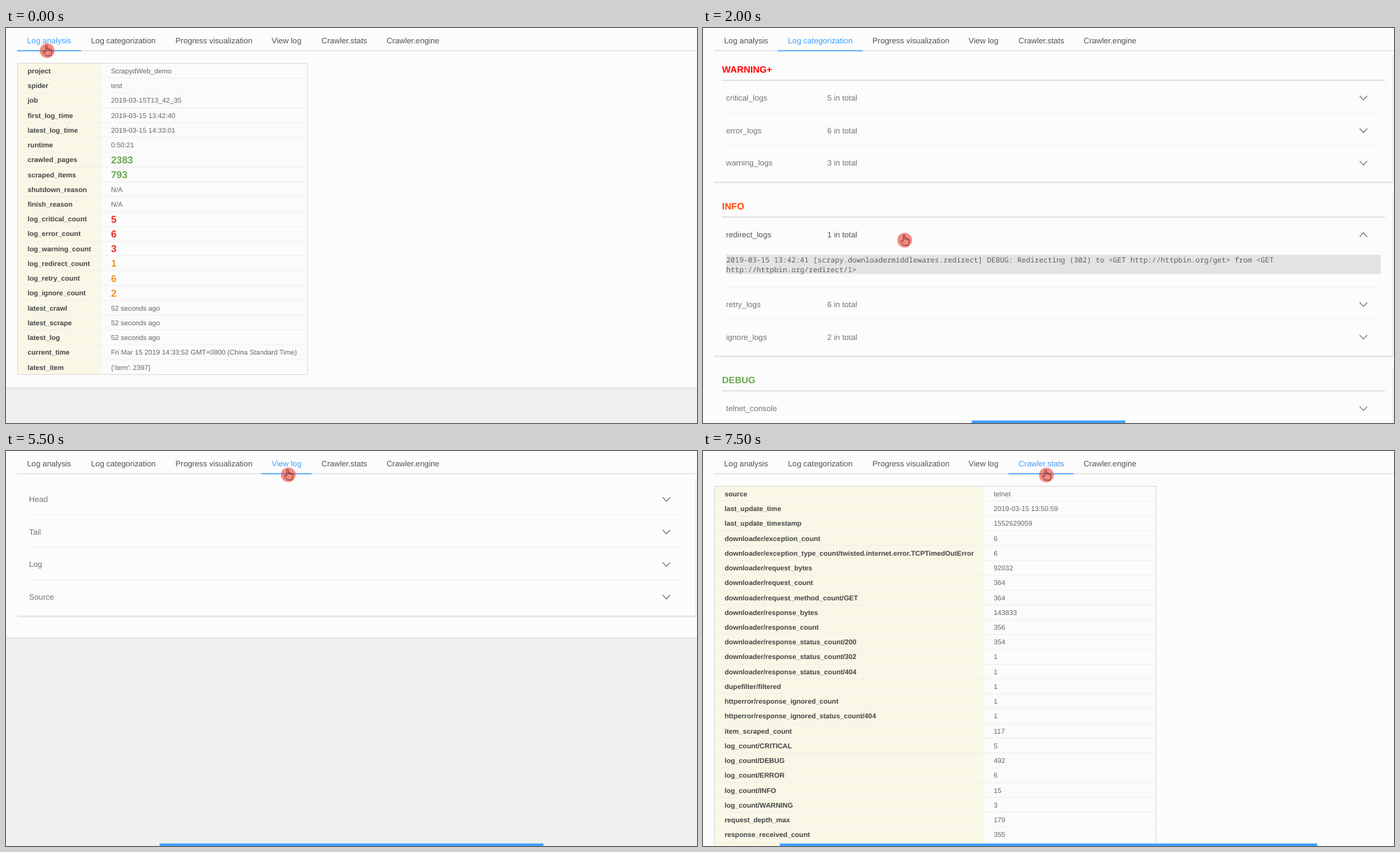
An HTML page for the animation above (8 s loop, 990x566 px).

```html
<!DOCTYPE html>
<html lang="en">
<head>
<meta charset="utf-8">
<title>Crawl log dashboard</title>
<style>
html, body { margin: 0; width: 100%; height: 100%; overflow: hidden; background: #fcfcfc; }
svg { display: block; width: 990px; height: 566px; font-family: "Liberation Sans", Arial, sans-serif; text-rendering: geometricPrecision; }
.scene { visibility: hidden; animation: 8s step-end infinite; }
.mono { font-family: "Noto Sans Mono", monospace; }
.chart { font-family: "Noto Sans", sans-serif; }
</style>
</head>
<body>
<svg id="stage" viewBox="0 0 990 566"></svg>
<script>
const LOOP = 8000, BLUE = '#409eff', GREEN = '#6aa84f', RED = '#f02a1d', ORANGE = '#ee922c';
const stage = document.getElementById('stage');
const css = document.createElement('style');
document.head.append(css);

const esc = s => String(s).replace(/&/g, '&amp;').replace(/</g, '&lt;');
const rect = (x, y, w, h, fill) => `<rect x="${x}" y="${y}" width="${w}" height="${h}" fill="${fill}"/>`;
const path = (d, stroke, width = 1, fill = 'none') =>
  `<path d="${d}" fill="${fill}" stroke="${stroke}" stroke-width="${width}"/>`;
const text = (x, y, str, size, fill, extra = '') =>
  `<text x="${x}" y="${y}" font-size="${size}" fill="${fill}" ${extra}>${esc(str)}</text>`;
const BOLD = 'font-weight="700"';

// Page furniture
const TABS = [
  ['Log analysis', 16, 107.5], ['Log categorization', 107.5, 228.5],
  ['Progress visualization', 228.5, 366.3], ['View log', 366.3, 437.7],
  ['Crawler.stats', 437.7, 531], ['Crawler.engine', 531, 635]
];
function tabs(active) {
  const [, left, right] = TABS[active];
  return rect(16, 31.8, 974, 1.4, '#dcdde0') + rect(left, 31.8, right - left, 1.5, BLUE) +
    TABS.map(([name, x], i) => text(x + 14.3, 22, name, 11.33, i === active ? BLUE : '#505255')).join('');
}
const bar = step => rect(495 - 55 * step, 562.4, 110 * step, 3.6, BLUE);
const hand = (x, y) => `<g transform="translate(${x} ${y})"><circle r="10.6" fill="#ee3f30" fill-opacity=".6"/>` +
  path('M-2.2 1.5V-6.2a1.2 1.2 0 0 1 2.4 0V-1M.2-2.2a1.1 1.1 0 0 1 2.2.3V-.4M2.4-1.7a1.1 1.1 0 0 1 2.1.4V.2' +
    'M4.5-.9a1 1 0 0 1 1.9.5V3L5 7.3H-1.6L-5.6 2.3c-.7-1.3.8-2.2 1.8-1.3L-2.2 2.4', '#6b2723', 0.9) + '</g>';
const footer = y => rect(0, y, 990, 566 - y, '#f0f0f0') + rect(0, y - 1, 990, 1.6, '#d9e2ec');

// Two-column table
function table(rows, split, right) {
  const top = 50.5, pitch = 21.24, bottom = top + rows.length * pitch;
  let out = rect(16.5, top, right - 16.5, bottom - top, '#fbfbfb') + rect(17, top, split - 17, bottom - top, '#f9f8e7');
  rows.forEach(([key, value, color], i) => {
    const mid = top + (i + 0.5) * pitch;
    if (i) out += rect(17, mid - pitch / 2 - 0.35, right - 17, 0.7, '#ebebea');
    out += text(31, mid + 3.7, key, 9.91, '#444', BOLD) +
      (color ? text(split + 14.3, mid + 5.2, value, 14.16, color, BOLD)
             : text(split + 14.3, mid + 3.7, value, 9.91, '#666'));
  });
  return out + path(`M16.5 ${top}H${right}V${bottom}H16.5Z`, '#d9d9d9', 0.9);
}

// Collapsible cards
const chevron = (y, open) => {
  const d = open ? -3 : 3;
  return path(`M940.8 ${y + 0.3 - d}L946.2 ${y + 0.3 + d - (open ? 0 : 0.2)}L951.6 ${y + 0.3 - d}`, '#76787b', 1.25);
};
const item = (y, name, total = '', open = false) =>
  text(33, y + 4, name, 11.33, open ? '#555' : '#747679') +
  text(178, y + 4, total, 11.33, open ? '#555' : '#747679') + chevron(y, open);
const rule = y => rect(32.5, y - 0.35, 938.5, 0.8, '#ebeef2');
const card = (top, bottom) => rect(988, top, 1.2, bottom - top, '#e6e8ec') +
  rect(16, bottom - 0.8, 973, 1.7, '#d9e0ea') + rect(16, bottom + 0.9, 973, 1, '#f0f3f6');
const heading = (y, name, color) => text(27.3, y + 4.6, name, 13.25, color, BOLD) + rect(27, y + 15.2, 950, 1.4, '#dadada');
const mono = (y, line) => text(33.3, y + 3.5, line, 10.38, '#606060', 'class="mono"');

function categories(open) {
  const shift = open ? 53.3 : 0, row = 46.65;
  let out = heading(59, 'WARNING+', '#f00');
  ['critical_logs,5', 'error_logs,6', 'warning_logs,3'].forEach((s, i) => {
    const [name, n] = s.split(',');
    out += item(100 + i * row, name, n + ' in total') + (i < 2 ? rule(122 + i * row) : '');
  });
  out += card(40, 221) + heading(255, 'INFO', '#ff4500') + item(296, 'redirect_logs', '1 in total', open);
  if (open) {
    out += rect(33, 325, 938, 27.5, '#e3e3e3') +
      mono(332.5, '2019-03-15 13:42:41 [scrapy.downloadermiddlewares.redirect] DEBUG: Redirecting (302) to <GET http://httpbin.org/get> from <GET') +
      mono(346, 'http://httpbin.org/redirect/1>');
  }
  out += rule(317.9 + shift) + item(342.7 + shift, 'retry_logs', '6 in total') +
    rule(364.4 + shift) + item(389.3 + shift, 'ignore_logs', '2 in total') + card(237, 417 + shift) +
    heading(450.7 + shift, 'DEBUG', GREEN) + item(491.8 + shift, 'telnet_console') + rect(988, 433 + shift, 1.2, 140, '#e6e8ec');
  if (!open) out += rule(513.7) + item(538.4, 'latest_crawl');
  return out;
}

// Charts
const PAGES = [0, 0, 43, 49, 52, 50, 42, 50, 50, 50, 50, 48, 49, 49, 51, 52, 48, 49, 36, 45, 48, 48, 49, 48, 49, 49,
  51, 49, 49, 50, 39, 50, 50, 49, 50, 49, 51, 50, 48, 50, 50, 52, 42, 49, 52, 49, 51, 49, 47, 49, 50];
const ITEMS = [0, 0, 15, 16, 17, 17, 14, 17, 16, 17, 17, 16, 16, 16, 17, 18, 16, 16, 12, 15, 16, 16, 16, 16, 16, 16,
  17, 17, 16, 17, 13, 17, 16, 17, 16, 17, 16, 17, 16, 17, 17, 17, 14, 16, 18, 16, 17, 16, 16, 16, 17];
const LEFT = 113.5, BAND = 15.245, RIGHT = LEFT + 51 * BAND;
const sums = list => { let n = 0; return list.map(v => n += v); };

function series(list, base, unit, color) {
  const pts = list.map((v, i) => [(LEFT + (i + 0.5) * BAND).toFixed(2), (base - v * unit).toFixed(2)]);
  return path('M' + pts.join('L'), color, 1.4) +
    pts.map(([x, y]) => `<circle cx="${x}" cy="${y}" r="1.5" fill="#fff" stroke="${color}" stroke-width=".8"/>`).join('');
}
function axis(base, gap, step, count) {
  let out = '';
  for (let i = 0; i <= count; i++) {
    const y = base - i * gap;
    if (i) out += rect(LEFT, y - 0.4, RIGHT - LEFT, 0.9, '#d4d4d4');
    out += path(`M${LEFT - 3.6} ${y}H${LEFT}`, '#444', 0.9) +
      text(107.8, y + 2.6, (i * step).toLocaleString('en-US'), 8.75, '#444', 'text-anchor="end"');
  }
  return out + path(`M${LEFT} ${base - gap * count}V${base}H${RIGHT}`, '#444', 1);
}
const tools = y => `<g transform="translate(0 ${y})">` +
  path('M487.7-.6a5.2 5.2 0 0 1 9.6-2.2M498.2.6a5.2 5.2 0 0 1-9.6 2.2M497.8-5.3v2.8h-2.8M488.2 5.3v-2.8h2.8' +
    'M507.2 1.5v3.7h9.6V1.5M512-5.3v7.8M509.2-.2l2.8 2.8l2.8-2.8', '#777', 0.9) + '</g>';
const handle = x => rect(x - 2.2, 312.3, 4.4, 11, '#a7b7cc') + path(`M${x} 308V328M${x - 0.7} 315v5.5M${x + 0.7} 315v5.5`, '#8fa2ba', 0.6);

function progress() {
  let out = '<g class="chart">' + text(20, 63.5, 'count / total', 12.8, '#333', BOLD) + tools(61) +
    text(20, 358, 'count / minute', 12.8, '#333', BOLD) + tools(355.3) + axis(291, 39.6, 500, 5);
  for (let i = 0; i < 8; i++) {
    const mins = 42 + 7 * i;
    const time = `${13 + Math.floor(mins / 60)}:${String(mins % 60).padStart(2, '0')}:40`;
    const tick = LEFT + (4 + 7 * i) * BAND;
    out += text(LEFT + (0.5 + 7 * i) * BAND, 303, '2019-03-15 ' + time, 8.75, '#444', 'text-anchor="middle"');
    if (i < 7) out += path(`M${tick} 291v3.6`, '#444', 0.9);
  }
  return out + series(sums(PAGES), 291, 0.0792, '#c23531') + series(sums(ITEMS), 291, 0.0792, '#2f4554') +
    rect(115, 307.6, 778, 20.5, '#d8e0e9') + path('M115 325L893 311V328H115Z', 'none', 0, '#cdd6df') +
    handle(115) + handle(892.8) +
    axis(585, 33, 10, 6) + series(PAGES, 585, 3.3, '#c23531') + series(ITEMS, 585, 3.3, '#2f4554') + '</g>';
}

// Log viewer
// One block per item: a crawl line per second value, then the scrape line and the item
const BLOCKS = [['39 stats 40 42', 42, 2283], ['43 44 45', 45, 2286], ['47 48 49', 49, 2289], ['51 52 53', 53, 2292], ['54 54 56', 56, 2295]];
function logLines() {
  const stamp = s => '2019-03-15 14:30:' + s;
  const crawl = s => stamp(s) + ' [scrapy.core.engine] DEBUG: Crawled (200) <GET http://httpbin.org/headers> (referer: http://httpbin.org/headers)';
  const scrape = s => stamp(s) + ' [scrapy.core.scraper] DEBUG: Scraped from <200 http://httpbin.org/headers>';
  const stats = stamp(40) + ' [scrapy.extensions.logstats] INFO: Crawled 2284 pages (at 47 pages/min), scraped 760 items (at 16 items/min)';
  const lines = [scrape(38), '', "{'item': 2280}"];
  for (const [secs, done, id] of BLOCKS) {
    lines.push(...secs.split(' ').map(s => s === 'stats' ? stats : crawl(s)), scrape(done), '', `{'item': ${id}}`);
  }
  return lines.slice(0, 32);
}
function viewer(open) {
  if (open) {
    return item(69, 'Head') + rule(91) + item(115.7, 'Tail', '', true) + rect(988, 40, 1.2, 526, '#e6e8ec') +
      rect(33, 145.3, 938, 421, '#e3e3e3') + logLines().map((s, i) => mono(152.5 + i * 13.435, s)).join('');
  }
  return footer(268) + card(40, 236.8) +
    ['Head', 'Tail', 'Log', 'Source'].map((s, i) => item(69 + i * 46.65, s) + (i < 3 ? rule(91 + i * 46.65) : '')).join('');
}

const ANALYSIS = [
  ['project', 'ScrapydWeb_demo'], ['spider', 'test'], ['job', '2019-03-15T13_42_35'],
  ['first_log_time', '2019-03-15 13:42:40'], ['latest_log_time', '2019-03-15 14:33:01'], ['runtime', '0:50:21'],
  ['crawled_pages', 2383, GREEN], ['scraped_items', 793, GREEN], ['shutdown_reason', 'N/A'], ['finish_reason', 'N/A'],
  ['log_critical_count', 5, RED], ['log_error_count', 6, RED], ['log_warning_count', 3, RED],
  ['log_redirect_count', 1, ORANGE], ['log_retry_count', 6, ORANGE], ['log_ignore_count', 2, ORANGE],
  ['latest_crawl', '52 seconds ago'], ['latest_scrape', '52 seconds ago'], ['latest_log', '52 seconds ago'],
  ['current_time', 'Fri Mar 15 2019 14:33:52 GMT+0800 (China Standard Time)'], ['latest_item', "{'item': 2397}"]
];
const STATS = [
  ['source', 'telnet'], ['last_update_time', '2019-03-15 13:50:59'], ['last_update_timestamp', 1552629059],
  ['downloader/exception_count', 6], ['downloader/exception_type_count/twisted.internet.error.TCPTimedOutError', 6],
  ['downloader/request_bytes', 92032], ['downloader/request_count', 364], ['downloader/request_method_count/GET', 364],
  ['downloader/response_bytes', 143833], ['downloader/response_count', 356],
  ['downloader/response_status_count/200', 354], ['downloader/response_status_count/302', 1],
  ['downloader/response_status_count/404', 1], ['dupefilter/filtered', 1], ['httperror/response_ignored_count', 1],
  ['httperror/response_ignored_status_count/404', 1], ['item_scraped_count', 117], ['log_count/CRITICAL', 5],
  ['log_count/DEBUG', 492], ['log_count/ERROR', 6], ['log_count/INFO', 15], ['log_count/WARNING', 3],
  ['request_depth_max', 179], ['response_received_count', 355], ['', '']
];

// Start time, active tab, body, pointer position
const SCENES = [
  [0, 0, footer(516) + table(ANALYSIS, 136.2, 432), 59, 32.5],
  [1500, 1, categories(false), 168, 34],
  [2000, 1, categories(true), 289, 304],
  [3500, 2, progress(), 294, 37],
  [4000, 2, progress(), 500, 200],
  [5500, 3, viewer(false), 404.5, 34],
  [6000, 3, viewer(true), 409.3, 125.2],
  [7500, 4, table(STATS, 402.3, 649), 492, 34.5]
];
SCENES.forEach(([start, tab, body, x, y], i) => {
  const end = i + 1 < SCENES.length ? SCENES[i + 1][0] : LOOP;
  const pct = t => t / LOOP * 100 + '%';
  css.textContent += `@keyframes scene${i} { 0% { visibility: hidden } ${pct(start)} { visibility: visible } ${pct(end)} { visibility: hidden } }\n`;
  stage.innerHTML += `<g class="scene" style="animation-name: scene${i}">${rect(0, 0, 990, 566, '#fcfcfc')}` +
    body + tabs(tab) + bar(i) + hand(x, y) + '</g>';
});
</script>
</body>
</html>
```
